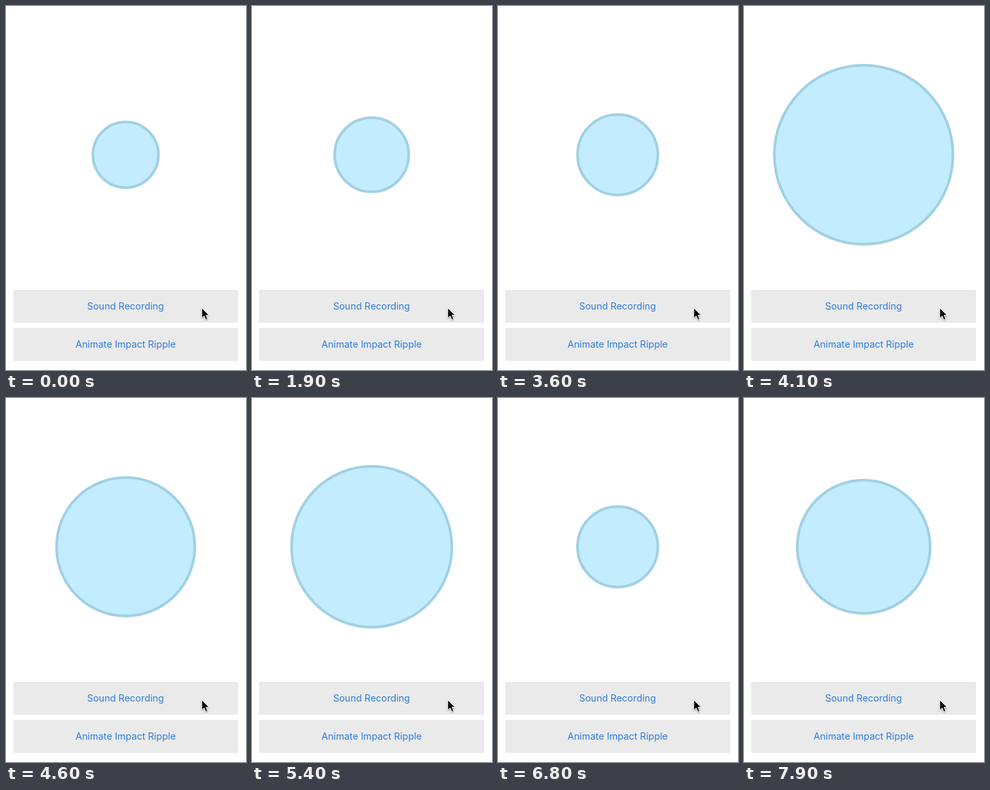
These frames come from a looping animation (366 by 554 pixels, 8 s). An HTML page:

```html
<!DOCTYPE html>
<html lang="en">
<head>
<meta charset="utf-8">
<title>Sound ripple</title>
<style>
  html, body { margin: 0; width: 100%; height: 100%; overflow: hidden; background: #fff; }
  svg { display: block; width: 366px; height: 554px; }
  text { font: 14.45px Inter, "Liberation Sans", sans-serif; fill: #2a7ce0; text-anchor: middle; }
  .bar { fill: #eaeaea; }
  #disc { fill: #c3ecfe; stroke: #a0d0e4; stroke-width: 4; }
  #cursor { stroke: #fff; stroke-width: 1; filter: drop-shadow(0 1px 1px #0005); }
</style>
</head>
<body>
<svg viewBox="0 0 366 554">
  <circle id="disc" cx="182.5" cy="226.4" r="50"/>
  <rect class="bar" x="11" y="432" width="343" height="50"/>
  <rect class="bar" x="11" y="490" width="343" height="50"/>
  <text x="182.3" y="462.4">Sound Recording</text>
  <text x="182.5" y="520.4">Animate Impact Ripple</text>
  <path id="cursor" d="M298.6 459.5V475L302.2 471.7L304.8 477.6L307.5 476.4L305 470.7H309.6Z"/>
</svg>
<script>
const LOOP = 8000, STEP = 100, REST = 50;
const disc = document.getElementById('disc');

// Each sound swells and fades as a bell curve
const sounds = [
  { peak: 1750, gain: 14, spread: 170 },
  { peak: 2800, gain: 5, spread: 220 },
  { peak: 4240, gain: 95, spread: 438 },
  { peak: 5755, gain: 92, spread: 721 },
  { peak: 8000, gain: 80, spread: 150 }
];

const swell = (t, { peak, gain, spread }) => gain * Math.exp(-(((t - peak) / spread) ** 2));

function draw(now) {
  // The level meter is sampled ten times a second
  const t = Math.floor(now % LOOP / STEP) * STEP;
  disc.setAttribute('r', sounds.reduce((r, sound) => r + swell(t, sound), REST));
  requestAnimationFrame(draw);
}
requestAnimationFrame(draw);
</script>
</body>
</html>
```
